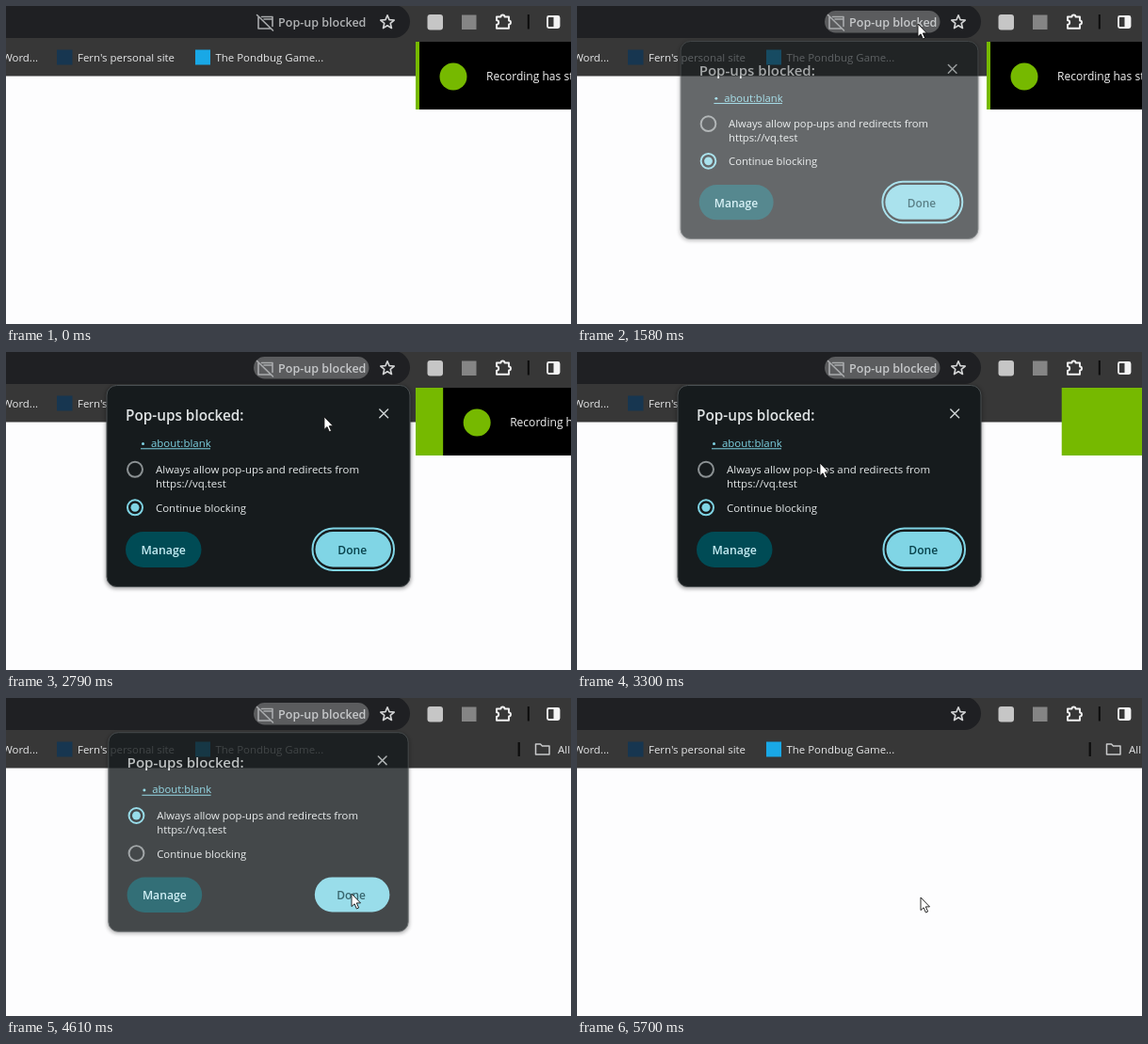
An HTML page for the animation above (5730 ms loop, 600 px wide and 338 px high).

```html
<!DOCTYPE html>
<html lang="en">
<head>
<meta charset="utf-8">
<title>Pop-up permission</title>
<style>
  html, body { margin: 0; width: 100%; height: 100%; overflow: hidden; background: #fdfdfe; }
  svg { display: block; width: 100vw; height: 100vh; }
  text { font: 11.45px "Open Sans", "Noto Sans", sans-serif; }
  .bold { font-weight: 600; }
  .line { fill: none; stroke-linecap: round; stroke-linejoin: round; }
</style>
</head>
<body>
<svg viewBox="0 0 600 338">
  <defs>
    <filter id="soft" x="-10%" y="-10%" width="120%" height="120%"><feGaussianBlur stdDeviation="2"/></filter>
  </defs>

  <rect width="600" height="338" fill="#fdfdfe"/>

  <g fill="#e6e7e8">
    <rect width="600" height="74.5" fill="#373737"/>
    <rect x="-40" y="-1" width="469" height="35" rx="17.5" fill="#1f2023"/>

    <g id="chip">
      <rect id="chipBg" x="263" y="5" width="122.5" height="23.5" rx="11.75" fill="#5b5c5e"/>
      <path class="line" stroke="#a9abad" stroke-width="1.6"
        d="M271.5 11.5H283V21.5M268 12V24H281M274 14H283M266.5 9.5L283.5 26"/>
      <text id="chipText" class="bold" x="289" y="22" style="font-size:12.55px">Pop-up blocked</text>
    </g>

    <path id="star" class="line" stroke="#d3d4d5" stroke-width="1.6"/>
    <rect x="447.5" y="9" width="16.5" height="16.5" rx="3" fill="#c6c6c6"/>
    <rect x="484" y="9.5" width="15.5" height="15.5" fill="#858585"/>
    <path class="line" stroke="#f2f2f2" stroke-width="1.9"
      d="M521 11.5H525.5A2 2 0 0 1 529.5 11.5H534V15.5A2 2 0 0 1 534 19.5V23.8H521V19.7A2.2 2.2 0 0 0 521 15.3Z"/>
    <rect x="553.8" y="9" width="2" height="15.5" fill="#0c0c0c"/>
    <rect x="575" y="11" width="12.5" height="12" rx="1.5" class="line" stroke="#f4f4f4" stroke-width="1.8"/>
    <rect x="581.5" y="11" width="6" height="12" fill="#f4f4f4"/>

    <text x="34" y="58.5" text-anchor="end">Word...</text>
    <rect x="54" y="46.5" width="16.5" height="16" fill="#173650"/>
    <text x="76" y="58.5">Fern's personal site</text>
    <rect x="201" y="46.5" width="16" height="16" fill="#19a8e6"/>
    <text x="222.5" y="58.5">The Pondbug Game...</text>
    <rect x="543.6" y="47" width="2.2" height="15" fill="#0c0c0c"/>
    <path class="line" stroke="#c9cacb" stroke-width="1.5"
      d="M562.5 49H567.5L569.5 51H577V60H562.5Z"/>
    <text x="586" y="58.5">All</text>
  </g>

  <g id="popup">
    <rect x="106" y="36" width="324" height="215.5" rx="11" fill="#000" opacity=".4" filter="url(#soft)"/>
    <rect x="107" y="35.5" width="322" height="214" rx="10.5" fill="#161b1d" stroke="#4b5153"/>
    <text class="bold" x="127" y="72.8" fill="#dfe3e4" style="font-size:15.3px">Pop-ups blocked:</text>
    <path class="line" stroke="#cdd2d3" stroke-width="1.5" d="M396.8 61L405.6 69.8M405.6 61L396.8 69.8"/>
    <g fill="#7fd4e4">
      <circle cx="145.5" cy="97.5" r="1.5"/>
      <text x="154" y="101">about:blank</text>
      <rect x="143" y="102.3" width="74" height="1"/>
    </g>
    <g fill="#e4e8e9">
      <text x="159" y="128.5">Always allow pop-ups and redirects from</text>
      <text x="159" y="144">https://vq.test</text>
      <text x="159" y="170">Continue blocking</text>
    </g>
    <g id="radios" fill="#7fd4e4" stroke-width="2">
      <g><circle cx="137" cy="124.8" r="8" fill="none"/><circle cx="137" cy="124.8" r="4.5"/></g>
      <g><circle cx="137" cy="165.3" r="8" fill="none"/><circle cx="137" cy="165.3" r="4.5"/></g>
    </g>
    <rect x="127" y="191" width="80.5" height="38" rx="19" fill="#004b55"/>
    <text class="bold" x="143.5" y="215" fill="#c5edf4" style="font-size:12.3px">Manage</text>
    <rect id="ring" x="325.5" y="187.6" width="86.5" height="44.3" rx="22" fill="none" stroke="#80d5e5" stroke-width="2"/>
    <rect x="328.5" y="191" width="80.5" height="37.5" rx="18.75" fill="#80d5e5"/>
    <text class="bold" x="352.3" y="215" fill="#06404a" style="font-size:12.1px">Done</text>
  </g>

  <rect id="green" x="435" y="38" width="320" height="72" fill="#76b900"/>
  <g id="notice">
    <rect x="439" y="38" width="320" height="72" fill="#000"/>
    <circle cx="475" cy="75" r="14.5" fill="#76b900"/>
    <text x="510" y="79.2" fill="#f1f1f1" style="font-size:12.05px">Recording has started</text>
  </g>

  <path id="cursor" d="M0 0V13.6L3.1 10.8L5.4 16L7.6 15L5.3 9.9H9.5Z" fill="#fff" stroke="#111" stroke-width=".9" stroke-linejoin="round"/>
</svg>

<script>
const LOOP = 5730;
const OPEN = 1450, PICK = 3680, CLOSE = 4570, FADE = 200;
const $ = id => document.getElementById(id);
const ramp = (t, a, b) => Math.min(1, Math.max(0, (t - a) / (b - a)));
const ease = u => u * u * (3 - 2 * u);
const slide = (el, x) => el.setAttribute("transform", `translate(${x} 0)`);

// pointer stops: time, x, y
const stops = [
  [180, 571, 340], [760, 476, 242], [1250, 362, 19], [1860, 362, 19],
  [2170, 362, 53], [2560, 362, 54], [3300, 258, 118], [3600, 138, 125],
  [3740, 138, 125], [4180, 346, 193], [4450, 367, 208], [4900, 367, 208],
  [5600, 365, 212]
];

function pointer(t) {
  const i = stops.findIndex(s => s[0] > t);
  if (i === 0) return stops[0].slice(1);
  if (i < 0) return stops[stops.length - 1].slice(1);
  const [t0, x0, y0] = stops[i - 1], [t1, x1, y1] = stops[i];
  const u = ease(ramp(t, t0, t1));
  return [x0 + (x1 - x0) * u, y0 + (y1 - y0) * u];
}

$("star").setAttribute("d", "M" + Array.from({ length: 10 }, (_, i) => {
  const r = i % 2 ? 3.4 : 7.6, a = i * Math.PI / 5;
  return `${(405 + r * Math.sin(a)).toFixed(2)} ${(17.4 - r * Math.cos(a)).toFixed(2)}`;
}).join("L") + "Z");

function draw(t) {
  const hover = ramp(t, 1160, 1240);
  $("chip").setAttribute("opacity", 1 - ramp(t, 5000, 5100));
  $("chipBg").setAttribute("opacity", hover);
  $("chipText").setAttribute("fill", hover > 0.5 ? "#c6c8ca" : "#b0b2b4");

  const shown = ramp(t, OPEN, OPEN + FADE) - ramp(t, CLOSE, CLOSE + FADE);
  const scale = 0.945 + 0.055 * shown;
  $("popup").setAttribute("opacity", shown);
  $("popup").setAttribute("transform",
    `translate(268 142.5) scale(${scale}) translate(-268 -142.5)`);
  $("ring").setAttribute("opacity", t < CLOSE ? 1 : 0);

  const picked = t < PICK ? 1 : 0;
  [...$("radios").children].forEach((radio, i) => {
    const [rim, dot] = radio.children;
    rim.setAttribute("stroke", i === picked ? "#7fd4e4" : "#8b9193");
    dot.setAttribute("opacity", i === picked ? 1 : 0);
  });

  slide($("notice"), 165 * ease(ramp(t, 2680, 3130)));
  slide($("green"), 166 * ease(ramp(t, 3060, 3555)));
  $("cursor").setAttribute("transform", `translate(${pointer(t).join(" ")})`);
}

const start = performance.now();
function tick() {
  draw((performance.now() - start) % LOOP);
  requestAnimationFrame(tick);
}
draw(0);
requestAnimationFrame(tick);
</script>
</body>
</html>
```
